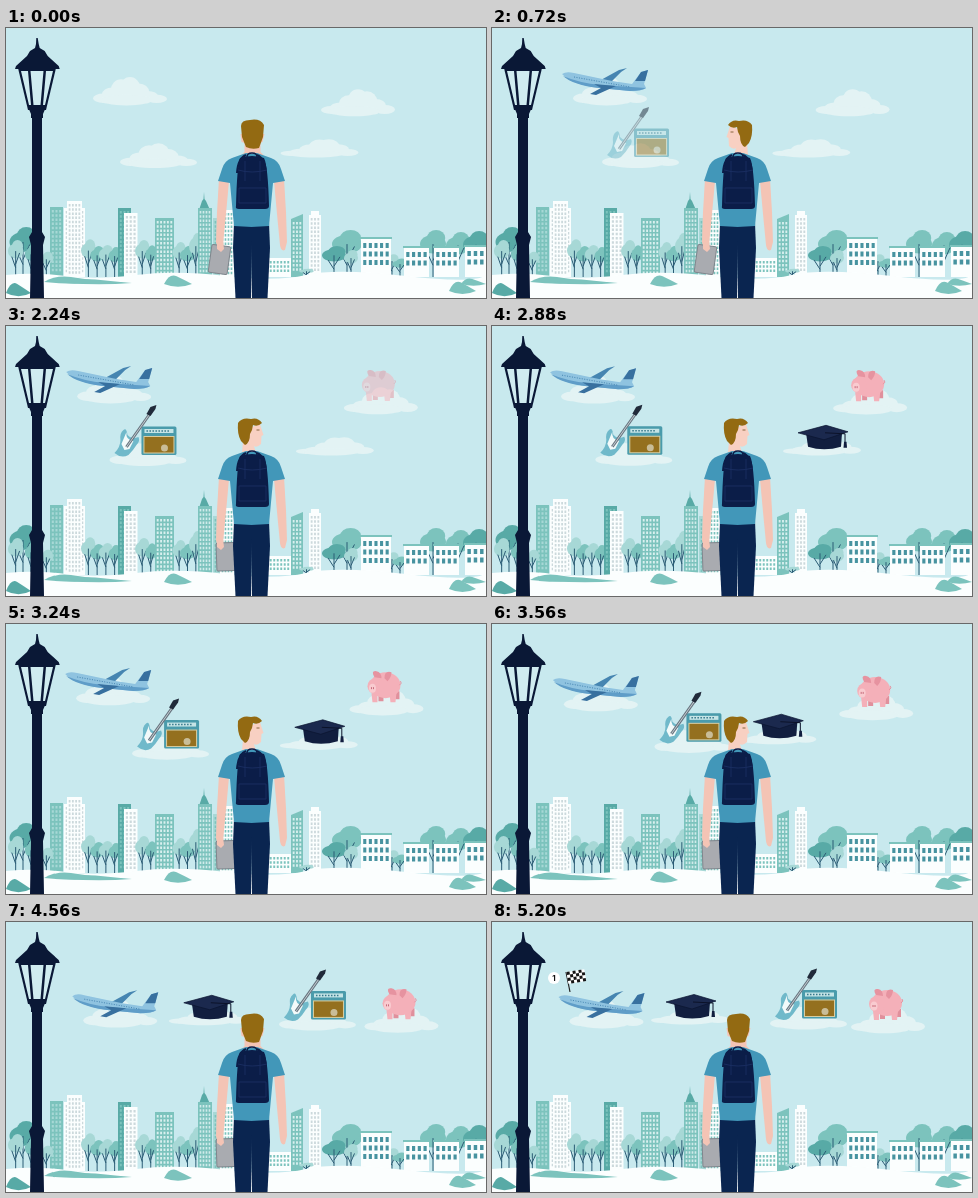
These frames come from a looping animation (480 px wide and 270 px high, 5240 ms). An HTML page:

```html
<!DOCTYPE html>
<html lang="en">
<head>
<meta charset="utf-8">
<title>Student daydream</title>
<style>
html, body { margin: 0; width: 100%; height: 100%; overflow: hidden; background: #c8e9ee; }
svg { display: block; width: 100vw; height: 100vh; }
text { font: bold 8px Inter, Arial, sans-serif; }
</style>
</head>
<body>
<svg viewBox="0 0 480 270">
  <defs>
    <path id="arm" fill="#f4c4b5" d="M213 151L223 153 220 186 217 217Q216 224 212 222L210 214 211 184z"/>
    <g id="body">
      <path fill="#0a2550" d="M228 195H246V212L245 270H229.500L227 220z"/>
      <path fill="#4297b9" d="M246 126L240 125 226 130Q218 133 216 141L212 153 224 155 228 198 246 199z"/>
      <path fill="none" stroke="#0b1d48" stroke-width="2" d="M240 127Q232 130 231 145"/>
    </g>
  </defs>
  <rect width="480" height="270" fill="#c8e9ee"/>
  <g id="city"></g>

  <g fill="#0a1836">
    <path d="M30.300 10h1.400l1 6 1 4 5 3 3 5 11 10 1 3H9l1-3 11-10 3-5 5-3 1-4z"/>
    <path d="M12 40H50L40 82H22z"/>
    <path fill="#d0ecf0" d="M15 43h7l3 34h-2zM24.500 43h13l-3 34h-7zM40 43h7l-8 34h-2z"/>
    <path d="M22 79h18l-3 7v4H25v-4zM26 88h10V204l3 5-2 8 1 53H24l1-53-2-8 3-5z"/>
  </g>

  <g id="plane">
    <g class="item">
      <path fill="#4685b1" d="M95 53L115 42 123 40 117 44 106 55z"/>
      <path fill="#8fc3e0" d="M58 46Q62 43 70 45L108 53 128 56 137 44 144 42 140 56 142 60Q138 63 126 63L95 60Q67 56 58 46z"/>
      <path fill="#5f9dc8" d="M59 48Q75 55 97 57L142 60Q138 63 126 63L95 60Q69 57 59 48z"/>
      <path fill="#38709f" d="M131 53L137 44 144 42 141 53zM90 56L112 58 92 67 86 66 97 60z"/>
      <path d="M70 49L126 59" stroke="#4685b1" stroke-dasharray="1 1.500"/>
    </g>
    <g id="flag" transform="translate(-8.500 -29)">
      <circle cx="62" cy="56" r="6" fill="#fff"/>
      <text x="62" y="59" text-anchor="middle" fill="#111">1</text>
      <path d="M74 50l4 20" stroke="#222" stroke-width="1.200"/>
      <g id="checks" transform="translate(74.500 50) rotate(-9)"></g>
    </g>
  </g>

  <g id="pig">
    <g class="item" fill="#f4b0b9">
      <path fill="#e0909c" d="M370 66h5v8h-5zM387 64h4v8h-4z"/>
      <path d="M363 66h6v9h-5zM381 66h7l-1 9h-5z"/>
      <ellipse cx="377" cy="58" rx="15" ry="13"/>
      <circle cx="367" cy="59" r="8"/>
      <path fill="#e693a0" d="M366 50Q362 43 368 44 373 45 373 51zM376 51Q376 43 383 45 383 50 379 54z"/>
      <ellipse cx="364" cy="61" rx="3.500" ry="4.500" fill="#f9cbd0"/>
      <path d="M363 60v2m2-2v2" stroke="#c76c7c"/>
      <path d="M391 58q3-2 1-4" fill="none" stroke="#e693a0"/>
    </g>
  </g>

  <g id="music">
    <g class="item">
      <rect x="134" y="100.500" width="35" height="28.500" rx="1.500" fill="#4a9bab"/>
      <path d="M137 105h29" stroke="#c5e4e6" stroke-width="4"/>
      <path d="M139 105h24" stroke="#36788b" stroke-width="1.500" stroke-dasharray="1.500"/>
      <rect x="136.500" y="110.500" width="30" height="16.500" fill="#94701f" stroke="#d8cda0"/>
      <circle cx="157" cy="122" r="3.500" fill="#c9bd98"/>
      <path fill="#70b9ca" d="M107 127Q113 121 113 114 112 107 116 104 119 101 120 109 124 114 131 111 133 115 129 119 126 124 121 129 114 133 107 127z"/>
      <path fill="#f2fafa" d="M119 106Q118 114 126 115L122 123 117 124 114 118z"/>
      <path d="M119 121L143 87" stroke="#697681" stroke-width="3"/>
      <path d="M119 121L143 87" stroke="#c3cbd0"/>
      <path fill="#202a3a" d="M139 88L143 81 149 79 148 83 143 90z"/>
    </g>
  </g>

  <g id="cap">
    <g class="item" fill="#111e3f">
      <path d="M315 107H351L350 121Q333 126 317 121z"/>
      <path fill="#1b294e" stroke="#0b1530" stroke-width=".7" d="M307 107L335 99.500 357 106 333 114z"/>
      <path d="M334 107l20 1v10" fill="none" stroke="#0b1229"/>
      <path d="M353 116h2.500l.5 6h-3.500z"/>
    </g>
  </g>

  <use href="#arm"/><use href="#arm" transform="matrix(-1 0 0 1 491 0)"/>
  <rect id="tablet" x="210" y="217" width="19" height="28" rx="1.500" fill="#a9abb0" stroke="#7f858c"/>
  <path fill="#f4c4b5" d="M211 213h6l1 8-3 3-4-3z"/>
  <g id="headBack">
    <path fill="#f4c4b5" d="M234.500 106h24l-2 8-2 1v9l3 3q-11 4-22 0l3-3v-9l-3-1z"/>
    <path fill="#936a12" d="M235 98Q235 92 244 92 254 90 258 97L257 109 253 120Q246 122 240 119L236 109z"/>
  </g>
  <g id="headSide">
    <path fill="#f8d0c2" d="M238 98L236.500 103 234.500 109 236.500 110 237 118Q241 122 244 120L242 127H256L254 104z"/>
    <path fill="#936a12" d="M236 97Q240 91 247 93 256 91 260 97 261 108 257 115L253 119Q248 117 248 108L246 104 245 99Q240 101 236 97z"/>
    <path d="M238.500 104h3" stroke="#6b4a1c" stroke-width=".8"/>
  </g>
  <use href="#body"/><use href="#body" transform="matrix(-1 0 0 1 491 0)"/>
  <g stroke="#1d3266" fill="#0b1d48">
    <path stroke="none" d="M234 130Q246 126 258 130 262 138 263 178 263 181 259 181H233Q229 181 230 178 231 138 234 130z"/>
    <path fill="none" stroke="#0b1d48" stroke-width="1.500" d="M241 129q0-4 5-4t5 4"/>
    <path fill="none" stroke-width=".8" d="M232 142q14 4 29 0M239 133v20m15-20v20M233 160h27v15h-27z"/>
  </g>
</svg>
<script>
const $ = id => document.getElementById(id);
const LOOP = 5240, STEP = 40, GROUND = 249;
const MID = '#7cc3bd', DARK = '#58aaa6', PALE = '#a7d8d6', INK = '#2b5c75', WHITE = '#fbfefe', GREY = '#ccd9dc';

let seed = 7;
const rand = (a, b) => a + (b - a) * ((seed = seed * 16807 % 2147483647) / 2147483647);
const rect = (x, y, w, h, fill) => `<rect x="${x}" y="${y}" width="${w}" height="${h}" fill="${fill}"/>`;
const path = (d, fill) => `<path d="${d}" fill="${fill}"/>`;
const blob = (x, y, rx, ry, fill) => `<ellipse cx="${x}" cy="${y}" rx="${rx}" ry="${ry}" fill="${fill}"/>`;

// Rows of windows that fill a box at an even pitch
function windows(x, y, w, h, px, py, fill) {
  const cols = Math.round(w / px), rows = Math.floor(h / py), step = w / cols;
  let d = '';
  for (let i = 0; i < cols * rows; i++)
    d += `M${x + (i % cols + .22) * step} ${y + Math.floor(i / cols) * py}h${step * .55}v${py * .6}h${-step * .55}z`;
  return path(d, fill);
}

function tower(x, top, w, wall, glass, slant = 0) {
  return path(`M${x} ${GROUND}V${top + slant}l${w} ${-slant}V${GROUND}z`, wall) +
    windows(x + 1, top + slant + 3, w - 2, GROUND - top - slant - 4, 3.3, 4.2, glass);
}

function house(x, top, w) {
  return rect(x, top, w, GROUND - top, WHITE) + rect(x - 1, top, w + 2, 2, MID) +
    windows(x + 1, top + 6, w - 2, GROUND - top - 7, 6, 8.5, '#4793a0');
}

function tree(x, top, w, fill) {
  const h = GROUND - top, y = top + h * .3;
  return blob(x, y, w * .5, h * .2, fill) + blob(x + w * .12, y - h * .13, w * .35, h * .17, fill) +
    `<path d="M${x} ${GROUND}V${y}m0 ${h * .45}l${-w * .25} ${-h * .3}m${w * .25} ${h * .2}l${w * .25} ${-h * .3}" fill="none" stroke="${INK}"/>`;
}

function grove(from, to, count, top) {
  let out = '';
  for (let i = 0; i < count; i++)
    out += tree(from + (to - from) * (i + .5) / count, top + rand(0, 16), rand(11, 16), i % 2 ? MID : PALE);
  return out;
}

const mound = (x, y, w, h, fill) => path(`M${x} ${y}q${w * .2} ${-h} ${w * .45} ${-h * .7}t${w * .55} ${h * .7}q${-w * .5} ${h * .5} ${-w} 0z`, fill);

$('city').innerHTML =
  tower(44, 179, 13, MID, PALE) + tree(17, 199, 27, DARK) + grove(2, 48, 3, 212) +
  tower(58, 180, 21, WHITE, GREY) + tower(61, 173, 15, WHITE, GREY) +
  grove(78, 113, 4, 206) + tower(112, 180, 13, DARK, MID) + tower(118, 185, 13.5, WHITE, GREY) +
  grove(132, 149, 2, 206) + tower(149, 190, 19, MID, '#d9f0ef') + grove(169, 194, 3, 203) +
  path('M193 182l3-9 1.500-2 .5-7 .5 7 1.500 2 4 9z', DARK) + tower(192, 180, 14, MID, '#d0ebea') +
  tower(207, 190, 8, PALE, MID) + tower(214, 182, 14, WHITE, MID) +
  tower(262, 230, 23, WHITE, MID) + tower(285, 186, 12, MID, '#d9f0ef', 5) +
  tower(303, 187, 12, WHITE, GREY) + rect(305, 183, 8, 5, WHITE) +
  grove(297, 304, 1, 226) + tree(341, 202, 30, MID) + tree(328, 218, 24, DARK) + tree(345, 222, 14, PALE) +
  grove(382, 398, 2, 216) + tree(427, 202, 26, MID) + tree(452, 204, 24, MID) + tree(470, 203, 26, DARK) +
  house(355, 209, 30) + house(398, 218, 25) + house(428, 218, 25) + house(459, 217, 21) +
  path('M0 247Q30 244 60 248T130 247T220 248T300 247T400 248T480 247V270H0z', WHITE) +
  mound(0, 265, 25, 13, DARK) + mound(38, 254, 60, 7, MID) + mound(60, 255, 66, 5, MID) +
  mound(158, 256, 28, 11, MID) + mound(443, 263, 27, 12, MID) + mound(455, 256, 25, 7, MID);

// A cloud is a row of ellipses swelling towards its peak
function cloud(x, base, w, h, peak) {
  let out = '';
  for (let i = 0; i <= 6; i++) {
    const u = i / 6, ry = h * (.16 + .34 * Math.exp(-(((u - peak) / .3) ** 2)));
    out += blob(x + w * (.14 + .72 * u), base - ry - h * .1 * Math.sin(Math.PI * u), w * .14, ry, '#e3f3f4');
  }
  return out + blob(x + w * .45, base - h * .12, w * .35, h * .22, '#e3f3f4');
}

const addCloud = (id, ...shape) => $(id).insertAdjacentHTML('afterbegin', cloud(...shape));
addCloud('plane', 69, 75, 74, 24, .45);
addCloud('pig', 341, 86, 74, 23, .55);
addCloud('music', 102, 138, 77, 21, .45);
addCloud('cap', 292, 128, 78, 16, .6);

let cells = rect(0, 0, 18, 12, '#fff');
for (let i = 0; i < 24; i++)
  if ((i + Math.floor(i / 6)) % 2 === 0) cells += rect(i % 6 * 3, Math.floor(i / 6) * 3, 3, 3, '#151515');
$('checks').innerHTML = cells;

// Each cloud drifts in, shows its item, then glides to its final place
const dreams = [
  { id: 'plane', drift: 18, dx: 8.5, dy: 29, show: 240 },
  { id: 'music', drift: 12, dx: 176, dy: -32.5, show: 560 },
  { id: 'pig', drift: -26, dx: 18, dy: 23, show: 2080 },
  { id: 'cap', drift: -17.5, dx: -133, dy: -27, show: 2400 }
];
const ramp = (t, a, b) => Math.min(1, Math.max(0, (t - a) / (b - a)));
const ease = u => u * u * (3 - 2 * u);

function draw(t) {
  const away = (1 - ramp(t, 0, 2880)) ** 1.4;
  const glide = ease(ramp(t, 2780, 4760));
  for (const { id, drift, dx, dy, show } of dreams) {
    $(id).setAttribute('transform', `translate(${drift * away + dx * glide} ${dy * glide})`);
    $(id).querySelector('.item').setAttribute('opacity', ramp(t, show, show + 320));
  }
  $('flag').setAttribute('opacity', ramp(t, 4720, 4960));

  const look = t < 240 || t >= 3840 ? 0 : t < 1960 ? -1 : 1;
  $('headBack').style.display = look ? 'none' : '';
  $('headSide').style.display = look ? '' : 'none';
  $('headSide').setAttribute('transform', look > 0 ? 'matrix(-1 0 0 1 492 0)' : '');

  const swing = 1 - ease(ramp(t, 880, 1280));
  $('tablet').setAttribute('transform', `translate(${-4 * swing} 0) rotate(${10 * swing - 2} 215 217)`);
}

const start = performance.now();
function tick() {
  const t = (performance.now() - start) % LOOP;
  draw(Math.floor(t / STEP) * STEP);
  requestAnimationFrame(tick);
}
tick();
</script>
</body>
</html>
```
